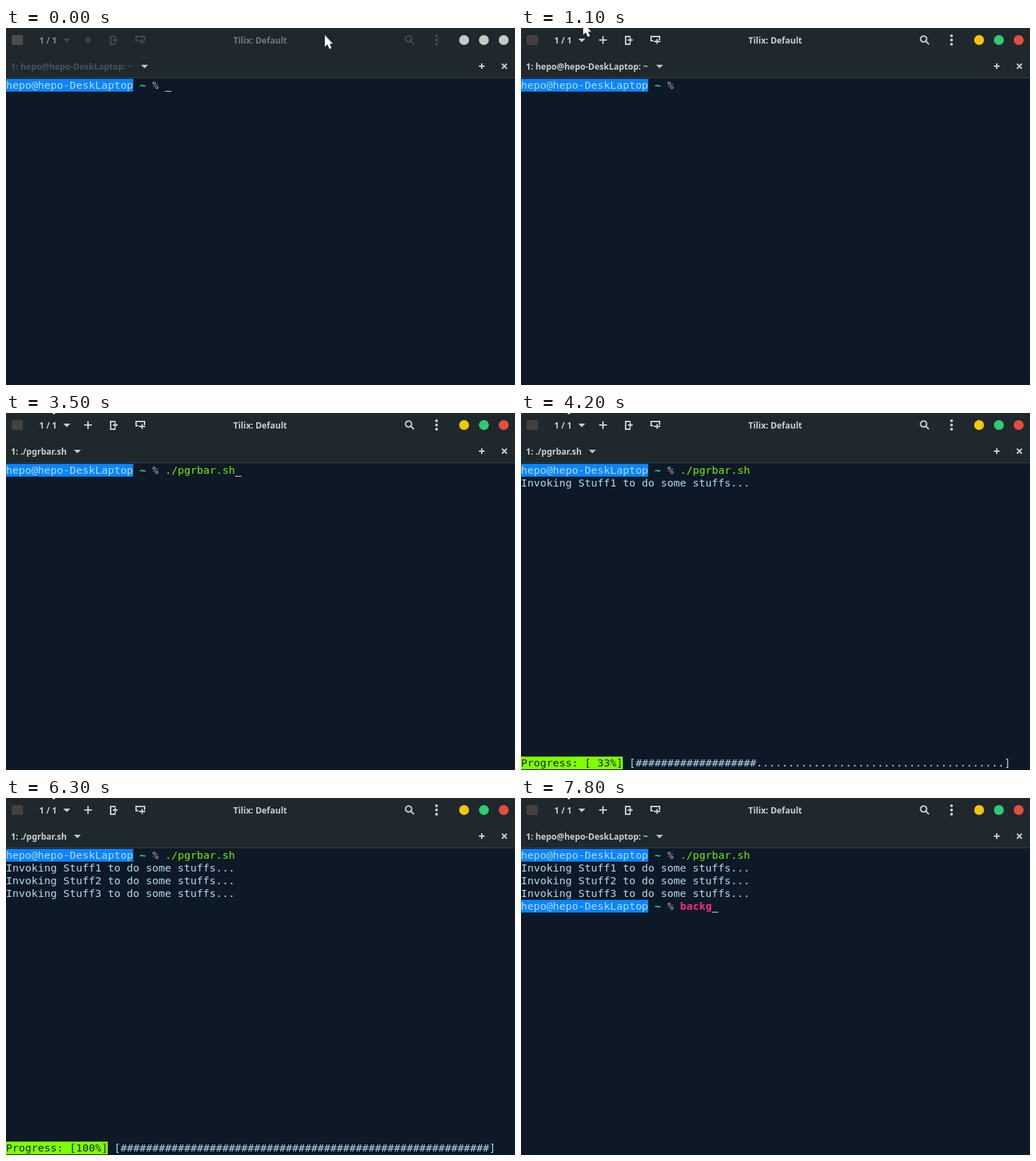
An HTML page with a canvas for the animation above (8 s loop, 720 by 505 pixels).

```html
<!DOCTYPE html>
<html lang="en">
<head>
<meta charset="utf-8">
<title>Terminal progress bar</title>
<style>
  html, body { margin: 0; width: 100%; height: 100%; overflow: hidden; background: #0d1926; }
  canvas { display: block; }
</style>
</head>
<body>
<canvas id="stage" width="720" height="505"></canvas>
<script>
const ctx = document.getElementById('stage').getContext('2d');
const LOOP = 8000, CELL = 9, ROW = 18, TOP = 72;
const UI = 'bold 12px "Noto Sans", sans-serif';
const MONO = '14.95px "DejaVu Sans Mono", monospace'; // advance of 9px
const USER = 'hepo@hepo-DeskLaptop';
const C = {
  bg: '#0d1926', bar: '#1f282c', line: '#384247', text: '#b2dcf0', cursor: '#c6dce6',
  blue: '#0a84ff', tilde: '#23e98a', percent: '#b4b4ac', green: '#76ee00',
  lime: '#80ff00', dark: '#16242c', pink: '#f92a7f'
};
const LIGHT = [201, 207, 209];

// Times at which the text cursor shows
const CURSOR_ON = [[0, 1100], [1700, 2300], [2600, 4200], [4600, 5300], [5600, 6300], [6900, LOOP]];
const STEPS = [3600, 4600, 5600];

const clamp = v => Math.max(0, Math.min(1, v));
const mix = (a, b, k) => `rgb(${a.map((v, i) => Math.round(v + (b[i] - v) * k))})`;

function rect(x, y, w, h, color) {
  ctx.fillStyle = color;
  ctx.fillRect(x, y, w, h);
}

function label(text, x, y, color, align = 'left') {
  ctx.font = UI;
  ctx.textAlign = align;
  ctx.fillStyle = color;
  ctx.fillText(text, x, y);
}

function cells(text, col, row, color, bold, back) {
  const x = col * CELL, y = TOP + row * ROW;
  if (back) rect(x, y, text.length * CELL, ROW, back);
  ctx.font = (bold ? 'bold ' : '') + MONO;
  ctx.textAlign = 'left';
  ctx.fillStyle = color;
  ctx.fillText(text, x, y + 14);
}

function shape(path, color, x = 0, y = 0) {
  ctx.save();
  ctx.translate(x, y);
  ctx.fillStyle = color;
  ctx.fill(new Path2D(path));
  ctx.restore();
}

function stroke(path, color, width = 2) {
  ctx.strokeStyle = color;
  ctx.lineWidth = width;
  ctx.stroke(new Path2D(path));
}

function disc(x, y, r, color) {
  ctx.fillStyle = color;
  ctx.beginPath();
  ctx.arc(x, y, r, 0, 7);
  ctx.fill();
}

const arrow = (x, y, color) => shape('M-5 0H5L0 5Z', color, x, y);

function header(t) {
  const focus = clamp((t - 500) / 200);
  const shade = dim => mix(dim, LIGHT, focus);
  const icon = shade([67, 77, 81]);
  const running = t >= 3500 && t < 6700;

  rect(0, 0, 720, 70, C.bar);
  rect(0, 70, 720, 1, C.line);

  ctx.fillStyle = mix([78, 77, 74], [67, 64, 61], focus);
  ctx.beginPath();
  ctx.roundRect(8, 10, 16, 14, 2);
  ctx.fill();

  label('1 / 1', 47, 22, shade([132, 140, 143]));
  arrow(86, 15, icon);
  stroke('M110.5 17H121.5M116 11.5V22.5', icon);
  stroke('M154 13V12H148V23H154V21M151 17H158M154.5 13.5V20.5', icon);
  stroke('M187 18H184V12H196V17M188 19H197M192.5 15.5V22.5', icon);
  label('Tilix: Default', 359.5, 22, shade([112, 121, 125]), 'center');
  stroke('M573.8 15.5A4.3 4.3 0 1 1 565.2 15.5A4.3 4.3 0 1 1 573.8 15.5M572.5 18.5L577 23', icon);
  for (const y of [11, 17, 23]) disc(609, y, 2, icon);
  [[241, 196, 15], [46, 204, 113], [231, 76, 60]].forEach((c, i) =>
    disc(648 + 28 * i, 17, 7, mix([199, 202, 203], c, focus)));

  label(running ? '1: ./pgrbar.sh' : `1: ${USER}: ~`, 7, 59, shade([67, 84, 91]));
  arrow(running ? 101 : 196, 52, '#c0c6c8');
  stroke('M669 54H677M673 50V58', '#c9cfd1');
  stroke('M701.5 50.5L708.5 57.5M708.5 50.5L701.5 57.5', '#c9cfd1');
}

function prompt(row) {
  cells(USER, 0, row, '#b4dcff', false, C.blue);
  cells('~', 21, row, C.tilde, true);
  cells('%', 23, row, C.percent);
}

function terminal(t) {
  const done = STEPS.filter(s => t >= s).length;
  const command = t < 2600 ? '' : t < 2800 ? './pgr' : './pgrbar.sh';
  let row = 0, col = 25 + command.length;

  prompt(0);
  cells(command, 25, 0, t < 2800 ? C.pink : C.green, t < 2800);
  for (let i = 1; i <= done; i++) cells(`Invoking Stuff${i} to do some stuffs...`, 0, i, C.text);

  if (t >= 6700) {
    const count = t < 7200 ? 0 : t >= 7800 ? 5 : Math.min(4, Math.floor((t - 7100) / 100));
    prompt(4);
    cells('backg'.slice(0, count), 25, 4, C.pink, true);
    row = 4;
    col = 25 + count;
  } else if (done) {
    const percent = Math.round(done * 100 / 3);
    const full = Math.floor(58 * percent / 100);
    cells(`Progress: [${String(percent).padStart(3)}%]`, 0, 23, C.dark, false, C.lime);
    cells(`[${'#'.repeat(full)}${'.'.repeat(58 - full)}]`, 17, 23, C.text);
    row = done + 1;
    col = 0;
  }

  if (CURSOR_ON.some(([a, b]) => t >= a && t < b))
    rect(col * CELL, TOP + row * ROW + 17, CELL, 1, C.cursor);
}

function pointer(t) {
  if (t >= 400 && t < 900) return;
  // Glides out over the top edge, halving its distance each step
  const k = 0.5 ** ((Math.min(t, 1300) - 1100) / 100);
  const [x, y] = t < 400 ? [451, 10] : [51 + 37 * k, -21 + 14 * k];
  shape('M0 0V16.5L3.7 13.2L6.5 19.6L9.4 18.4L6.8 12.2H11.3Z', '#fff', x, y);
}

function draw(now) {
  const t = Math.floor(now % LOOP / 100) * 100;
  rect(0, 0, 720, 505, C.bg);
  header(t);
  terminal(t);
  pointer(t);
}

const start = performance.now();
function tick() {
  draw(performance.now() - start);
  requestAnimationFrame(tick);
}
tick();
</script>
</body>
</html>
```
